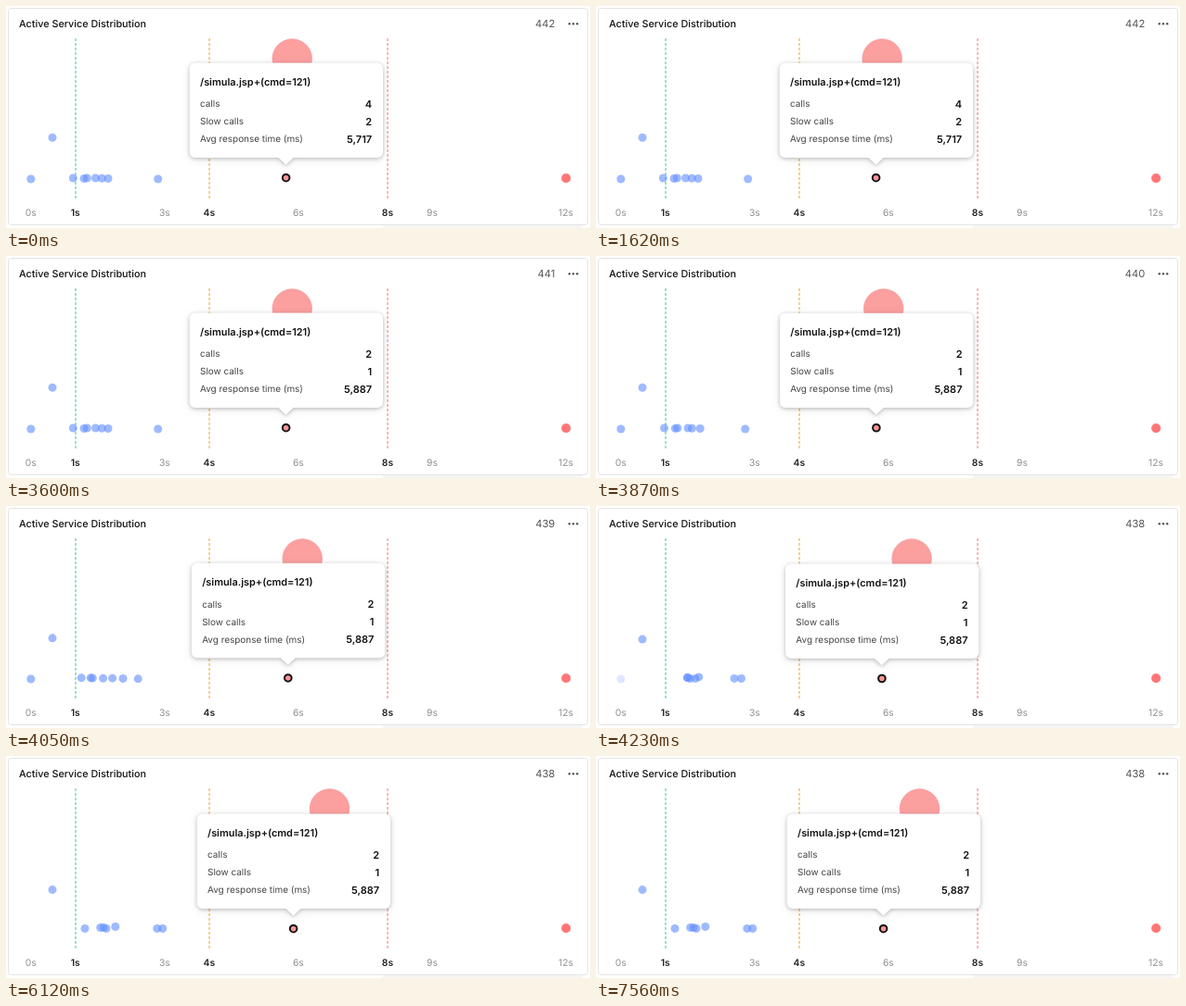
An HTML page that plays this animation: 629x240 px, repeating every 8000 ms.

```html
<!DOCTYPE html>
<html lang="en">
<head>
<meta charset="utf-8">
<title>Active Service Distribution</title>
<style>
  html, body { margin: 0; width: 100%; height: 100%; overflow: hidden; background: #fff; }
  svg { display: block; width: 629px; height: 240px; font: 10.3px Inter, sans-serif; text-rendering: geometricPrecision; }
  .heading { font-size: 10.8px; font-weight: 500; fill: #111; }
  .count { font-size: 11.2px; fill: #555; text-anchor: end; }
  .axis { fill: #8f8f8f; text-anchor: middle; }
  .axis.limit { fill: #222; font-weight: 600; }
  .limit-line { stroke-width: 1.2; stroke-dasharray: 3 2; }
  .call { fill: #6490ff; fill-opacity: .62; }
  .slow { fill: #fb9f9f; }
  .stuck { fill: #ff5d5d; fill-opacity: .62; }
  .bubble { fill: #fff; filter: drop-shadow(0 1px 2px rgba(0, 0, 0, .24)) drop-shadow(0 2px 5px rgba(0, 0, 0, .08)); }
  .path { font-size: 10.9px; font-weight: 600; fill: #111; }
  .label { font-size: 9.95px; fill: #444; }
  .value { font-size: 11px; font-weight: 600; fill: #111; text-anchor: end; }
</style>
</head>
<body>
<svg viewBox="0 0 629 240">
  <path d="M406 238.5H621" stroke="#f5f5f5" stroke-width="3"/>
  <rect x="2.5" y="2.5" width="624" height="234" rx="3" fill="#fff" stroke="#e4e4e4"/>
  <text class="heading" x="14" y="23">Active Service Distribution</text>
  <text class="count" id="count" x="591.3" y="23"></text>
  <g fill="#555">
    <circle cx="606.8" cy="19.3" r="1.2"/><circle cx="611" cy="19.3" r="1.2"/><circle cx="615.2" cy="19.3" r="1.2"/>
  </g>
  <g id="axis"></g>
  <g id="calls"></g>
  <circle class="stuck" cx="603.2" cy="186.2" r="5.1"/>
  <circle class="stuck" cx="603.2" cy="186.2" r="4.7"/>
  <circle class="slow" id="big" cy="57" r="21.7"/>
  <g id="tooltip">
    <circle cx="301.6" cy="185.7" r="3.8" fill="#fb9595" stroke="#111" stroke-width="2"/>
    <path class="bubble" d="M203.7 61.6H400a6 6 0 0 1 6 6V158a6 6 0 0 1-6 6H309.5L301.5 171.5L293.5 164H203.7a6 6 0 0 1-6-6V67.6a6 6 0 0 1 6-6Z"/>
    <text class="path" x="209" y="85.8">/simula.jsp+(cmd=121)</text>
    <text class="label" x="209" y="109.4">calls</text>
    <text class="label" x="209" y="128.4">Slow calls</text>
    <text class="label" x="209" y="147.3">Avg response time (ms)</text>
    <text class="value" x="394.2" y="110"></text>
    <text class="value" x="394.2" y="129"></text>
    <text class="value" x="394.2" y="147.9"></text>
  </g>
</svg>
<script>
const LOOP = 8000, STEP = 90;
const UPDATE = 3600, MOVE_START = 3590, MOVE_TIME = 1070;
const byId = id => document.getElementById(id);

function add(parent, tag, attrs, text = '') {
  const node = document.createElementNS('http://www.w3.org/2000/svg', tag);
  for (const name in attrs) node.setAttribute(name, attrs[name]);
  node.textContent = text;
  return parent.appendChild(node);
}

const secondX = s => 26.7 + s * 48.03;
const limits = { 1: '#63cba9', 4: '#f3b04d', 8: '#f58b8b' };
for (const s of [0, 1, 3, 4, 6, 8, 9, 12]) {
  const limit = limits[s];
  add(byId('axis'), 'text', { class: limit ? 'axis limit' : 'axis', x: secondX(s), y: 227 }, s + 's');
  if (limit) {
    const x = Math.round(secondX(s));
    add(byId('axis'), 'path', { class: 'limit-line', d: `M${x} 35V210`, stroke: limit });
  }
}

// Each call moves from [x, y] to [x, y]; the one without an end fades out.
const calls = [
  [[26.8, 187]],
  [[50, 142.2], [50, 144.6]],
  [[72.3, 186], [105, 185.5]],
  [[84, 186.5], [117.8, 184.5]],
  [[87.3, 186], [101.7, 185.5]],
  [[96.5, 186], [162.8, 186.5]],
  [[103.3, 186.3], [108, 186.5]],
  [[110, 186.5], [168.7, 186.5]],
  [[163.7, 187], [85, 186.5]]
].map(([from, to]) => ({ from, to, node: add(byId('calls'), 'circle', { class: 'call', r: 4.5, cx: from[0], cy: from[1] }) }));

const values = document.querySelectorAll('.value');
const clamp = v => Math.min(1, Math.max(0, v));
const mix = (a, b, p) => a + (b - a) * p;
const quartInOut = p => p < .5 ? 8 * p ** 4 : 1 - 8 * (1 - p) ** 4;

function countAt(t) {
  return 442 - [UPDATE, 3780, 3960, 4230].filter(time => t >= time).length;
}

function draw(t) {
  const p = quartInOut(clamp((t - MOVE_START) / MOVE_TIME));
  byId('count').textContent = countAt(t);
  byId('big').setAttribute('cx', mix(308.2, 348.5, p));
  byId('tooltip').setAttribute('transform', `translate(${8 * p} ${p})`);
  const stats = t < UPDATE ? ['4', '2', '5,717'] : ['2', '1', '5,887'];
  values.forEach((node, i) => node.textContent = stats[i]);
  for (const { from, to, node } of calls) {
    if (to) {
      node.setAttribute('cx', mix(from[0], to[0], p));
      node.setAttribute('cy', mix(from[1], to[1], p));
    } else {
      node.setAttribute('opacity', 1 - clamp((t - 4050) / 270));
    }
  }
}

const start = performance.now();
function tick() {
  const t = (performance.now() - start) % LOOP;
  draw(Math.floor(t / STEP) * STEP);
  requestAnimationFrame(tick);
}
tick();
</script>
</body>
</html>
```
